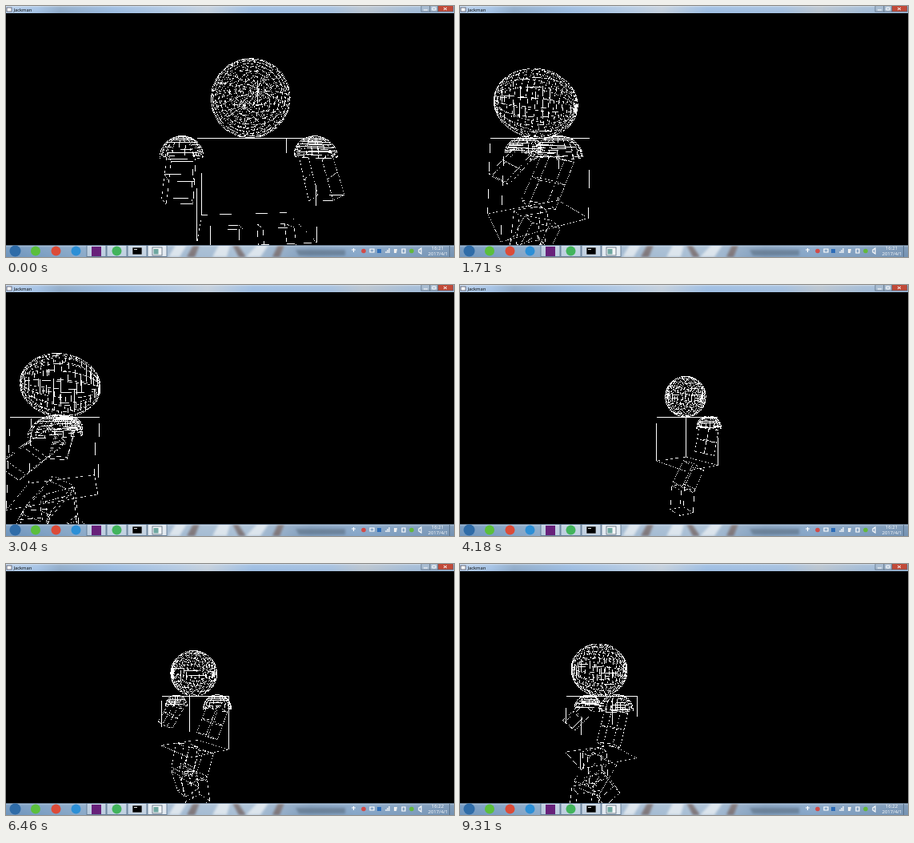
Animation of 560x314 px, one loop 9500 ms. Source, as an HTML page with a canvas:

```html
<!DOCTYPE html>
<html lang="en">
<head>
<meta charset="utf-8">
<title>Jackman</title>
<style>
  html, body { margin: 0; width: 100%; height: 100%; overflow: hidden; background: #000; }
  canvas, svg { position: absolute; left: 0; top: 0; width: 560px; height: 314px; display: block; }
  canvas { image-rendering: pixelated; }
  text { font-family: "Open Sans", "Noto Sans", sans-serif; }
</style>
</head>
<body>
<canvas id="view" width="560" height="314"></canvas>
<svg viewBox="0 0 560 314">
  <defs>
    <linearGradient id="title">
      <stop offset="0" stop-color="#b4cdea"/>
      <stop offset=".07" stop-color="#a3c1e4"/>
      <stop offset=".12" stop-color="#8fabc9"/>
      <stop offset=".24" stop-color="#9bbbe0"/>
      <stop offset=".38" stop-color="#b3c9e2"/>
      <stop offset=".45" stop-color="#c3cfdc"/>
      <stop offset=".55" stop-color="#9dbde2"/>
      <stop offset=".72" stop-color="#a3bfdf"/>
      <stop offset=".8" stop-color="#b9c4cf"/>
      <stop offset=".9" stop-color="#a4bcd6"/>
      <stop offset="1" stop-color="#9db9d8"/>
    </linearGradient>
    <linearGradient id="bar">
      <stop offset="0" stop-color="#6f95bd"/>
      <stop offset=".2" stop-color="#8eacca"/>
      <stop offset=".37" stop-color="#a3bad1"/>
      <stop offset=".55" stop-color="#a9bfd5"/>
      <stop offset=".68" stop-color="#7f9cbb"/>
      <stop offset=".78" stop-color="#86a6c8"/>
      <stop offset="1" stop-color="#7593b3"/>
    </linearGradient>
    <linearGradient id="gloss" x2="0" y2="1">
      <stop offset="0" stop-color="#fff" stop-opacity=".5"/>
      <stop offset=".2" stop-color="#fff" stop-opacity=".08"/>
      <stop offset="1" stop-color="#fff" stop-opacity="0"/>
    </linearGradient>
    <filter id="soft"><feGaussianBlur stdDeviation="1.5"/></filter>
  </defs>

  <rect width="560" height="9" fill="url(#title)"/>
  <path d="M45 6h85M420 6h60" stroke="#5f7387" stroke-opacity=".45" stroke-width="3" filter="url(#soft)"/>
  <rect width="560" height="9" fill="url(#gloss)"/>
  <rect x="1" y="2" width="6" height="5" fill="#f4f6f8" stroke="#556" stroke-width=".8"/>
  <text x="9.500" y="7" font-size="5.8" fill="#000">Jackman</text>
  <g stroke="#4a5c6e" stroke-width=".6">
    <rect x="519" y="-1" width="11" height="8" fill="#a9bdd2"/>
    <rect x="530" y="-1" width="10" height="8" fill="#a9bdd2"/>
    <rect x="540" y="-1" width="19" height="8" fill="#c24a38"/>
  </g>
  <path d="M522 5h5M533 2h4v3h-4zM547 2l4 3m0-3l-4 3" fill="none" stroke="#fff"/>

  <rect y="299" width="560" height="15" fill="url(#bar)"/>
  <svg y="299" width="560" height="15">
    <g filter="url(#soft)">
      <path d="M203 15l9-15h14l-9 15zM258 15l8-15h14l-4 15zM300 15l14-15h14l-10 15z" fill="#dbe4ec"/>
      <path d="M226 15l8-15h8l-6 15zM283 0h7l10 15h-9zM333 15l7-15h8l-6 15z" fill="#7d7478"/>
      <path d="M362 6h62v7h-58z" fill="#5d7186" fill-opacity=".7"/>
    </g>
  </svg>
  <rect y="299" width="560" height="15" fill="url(#gloss)"/>
  <path d="M0 299.5h560" stroke="#4c6075" stroke-opacity=".8"/>
  <g fill="#fff" fill-opacity=".4" stroke="#566f89" stroke-width=".8">
    <rect x="101" y="299.5" width="24" height="14"/>
    <rect x="126" y="299.5" width="25" height="14"/>
    <rect x="152" y="299.5" width="24" height="14"/>
    <rect x="177" y="299.5" width="24" height="14" fill-opacity=".7"/>
  </g>
  <circle cx="11.5" cy="306.5" r="7" fill="#2f6ca8"/>
  <circle cx="37" cy="306.5" r="6" fill="#5bbf3c"/>
  <circle cx="62.5" cy="306.5" r="6" fill="#dc4b38"/>
  <circle cx="87.5" cy="306.5" r="6" fill="#2c8fd6"/>
  <rect x="107" y="301" width="12" height="12" fill="#68217a"/>
  <circle cx="138.5" cy="306.5" r="6" fill="#42b45c"/>
  <rect x="158" y="302" width="12" height="9" fill="#000" stroke="#ccd4dc" stroke-width=".7"/>
  <path d="M160 304.5h4" stroke="#ddd"/>
  <rect x="183" y="302" width="12" height="10" fill="#f4f6f8" stroke="#566778" stroke-width=".8"/>
  <rect x="184.5" y="304" width="6" height="6.5" fill="#6fa7a0"/>

  <path d="M432 305h5M434.5 303v5M455 304h5v4h-5zM475 309v-2m2 2v-4m2 4v-6M495 304h4v5h-4zM516 305l3-2v7l-3-2z" fill="none" stroke="#fff" stroke-width="1.2"/>
  <circle cx="447" cy="306.5" r="2.8" fill="#d24b48"/>
  <rect x="464" y="304" width="5" height="5" fill="#2d6db8"/>
  <path d="M485 304h4l-1 5h-3z" fill="#eee"/>
  <circle cx="507" cy="306.5" r="2.8" fill="#62b83c"/>
  <g fill="#fff" font-size="6" text-anchor="middle">
    <text id="clock" x="539.5" y="305.3">16:21</text>
    <text x="540" y="312.3">2017/4/1</text>
  </g>
  <path d="M554.5 300v14" stroke="#5b738c"/>
</svg>
<script>
const LOOP = 9500, STEP = 190;
const SCALE = 1366 / 560, FOCAL = 270 * SCALE, MID_X = 683, HORIZON = 403;
const TILT = .04; // the camera looks slightly upwards
const ctx = document.getElementById("view").getContext("2d");
const clock = document.getElementById("clock");

// time, x, distance, yaw in degrees, gait in cycles
const keys = [
  [0, .57, 6.2, -4.4, .25],
  [760, .15, 5.25, 4, 1],
  [1140, 0, 5.55, 8, 1.4],
  [1330, -4.75, 7.05, 43, -1.72],
  [2280, -4.75, 7.05, 43, -.75],
  [3040, -5.95, 7.68, 56, 0],
  [3230, -5.95, 7.68, 56, .2],
  [3420, 3.1, 14, 55, -.2],
  [4180, .08, 11.9, 55, .6],
  [4560, -1.78, 10.65, 50, 1],
  [6460, -1.78, 10.65, 50, 2.72],
  [6840, -1.78, 10.65, 50, 3.1],
  [7790, -2.68, 9.95, 53, 4],
  [7980, -3, 9.75, 53, 4.2],
  [9120, -3.62, 9.3, 52, 5.4],
  [9310, -3.62, 9.3, 52, 5.58]
];

function poseAt(t) {
  const next = keys.findIndex(k => k[0] > t);
  if (next < 0) return keys[keys.length - 1];
  const a = keys[next - 1], b = keys[next];
  const f = (t - a[0]) / (b[0] - a[0]);
  return a.map((v, i) => v + (b[i] - v) * f);
}

// The large screen is reduced by keeping single rows and columns, which breaks up thin lines.
function sample(v) {
  const p = Math.floor(v / SCALE);
  return Math.floor((p + .5) * SCALE) === v ? p : -1;
}

let body;

function project([u, y, v]) {
  const x = body.x + u * body.cos - v * body.sin;
  const z = body.z - u * body.sin - v * body.cos + y * TILT;
  return [MID_X + x * FOCAL / z, HORIZON - y * FOCAL / z];
}

function line(p, q) {
  const [x0, y0] = project(p), [x1, y1] = project(q);
  const n = Math.max(1, Math.ceil(Math.max(Math.abs(x1 - x0), Math.abs(y1 - y0))));
  for (let i = 0; i <= n; i++) {
    const x = sample(Math.round(x0 + (x1 - x0) * i / n));
    const y = sample(Math.round(y0 + (y1 - y0) * i / n));
    if (x >= 0 && y >= 9 && y < 299) ctx.fillRect(x, y, 1, 1);
  }
}

// Box hanging from a joint and swung forward; returns the joint at its lower end.
function box([u, y, v], degrees, width, depth, length) {
  const a = degrees * Math.PI / 180, c = Math.cos(a), s = Math.sin(a);
  const at = (across, ahead, down) =>
    [u + across * width / 2, y - down * c + ahead * s * depth / 2, v + down * s + ahead * c * depth / 2];
  const ring = [[-1, -1], [1, -1], [1, 1], [-1, 1]];
  ring.forEach(([i, j], n) => {
    const [k, l] = ring[(n + 1) % 4];
    line(at(i, j, 0), at(k, l, 0));
    line(at(i, j, length), at(k, l, length));
    line(at(i, j, 0), at(i, j, length));
  });
  return at(0, 0, length);
}

function ball([u, y, v], radius, stacks, range, upright) {
  const slices = 20;
  const at = (i, j) => {
    const th = range * i / stacks, ph = 2 * Math.PI * j / slices;
    const pole = radius * Math.cos(th);
    const side = radius * Math.sin(th) * Math.cos(ph);
    const other = radius * Math.sin(th) * Math.sin(ph);
    return upright ? [u + side, y + pole, v + other] : [u + side, y + other, v + pole];
  };
  for (let i = 0; i < stacks; i++) {
    for (let j = 0; j < slices; j++) {
      line(at(i, j), at(i + 1, j));
      line(at(i + 1, j), at(i + 1, j + 1));
    }
  }
}

function limbs(side, swing) {
  const shoulder = [side * 1.92, -.53, 0];
  const arm = 29 + 18 * swing;
  ball(shoulder, .6, 10, Math.PI / 2, true);
  const elbow = box(shoulder, arm, .7, .6, .6);
  box(elbow, arm, .7, .6, .6);
  const thigh = 15 - 22 * swing;
  const knee = box([side * .7, -2.5, 0], thigh, .85, .8, 1.2);
  box(knee, thigh - 28, .85, .8, 1.15);
}

function draw(t) {
  const [, x, z, yaw, gait] = poseAt(t);
  const a = yaw * Math.PI / 180, swing = Math.cos(gait * 2 * Math.PI);
  body = { x, z, cos: Math.cos(a), sin: Math.sin(a) };
  ctx.fillStyle = "#000";
  ctx.fillRect(0, 0, 560, 314);
  ctx.fillStyle = "#fff";
  ball([0, 1.13, 0], 1.13, 20, Math.PI, false);
  box([0, 0, 0], 0, 2.85, 2.1, 2.5);
  limbs(1, swing);
  if (t < 3420 || t >= 4560) limbs(-1, -swing);
  clock.textContent = t < 4750 ? "16:21" : "16:22";
}

let shown = -1;
function tick() {
  const t = Math.floor(performance.now() % LOOP / STEP) * STEP;
  if (t !== shown) draw(shown = t);
  requestAnimationFrame(tick);
}
tick();
</script>
</body>
</html>
```
